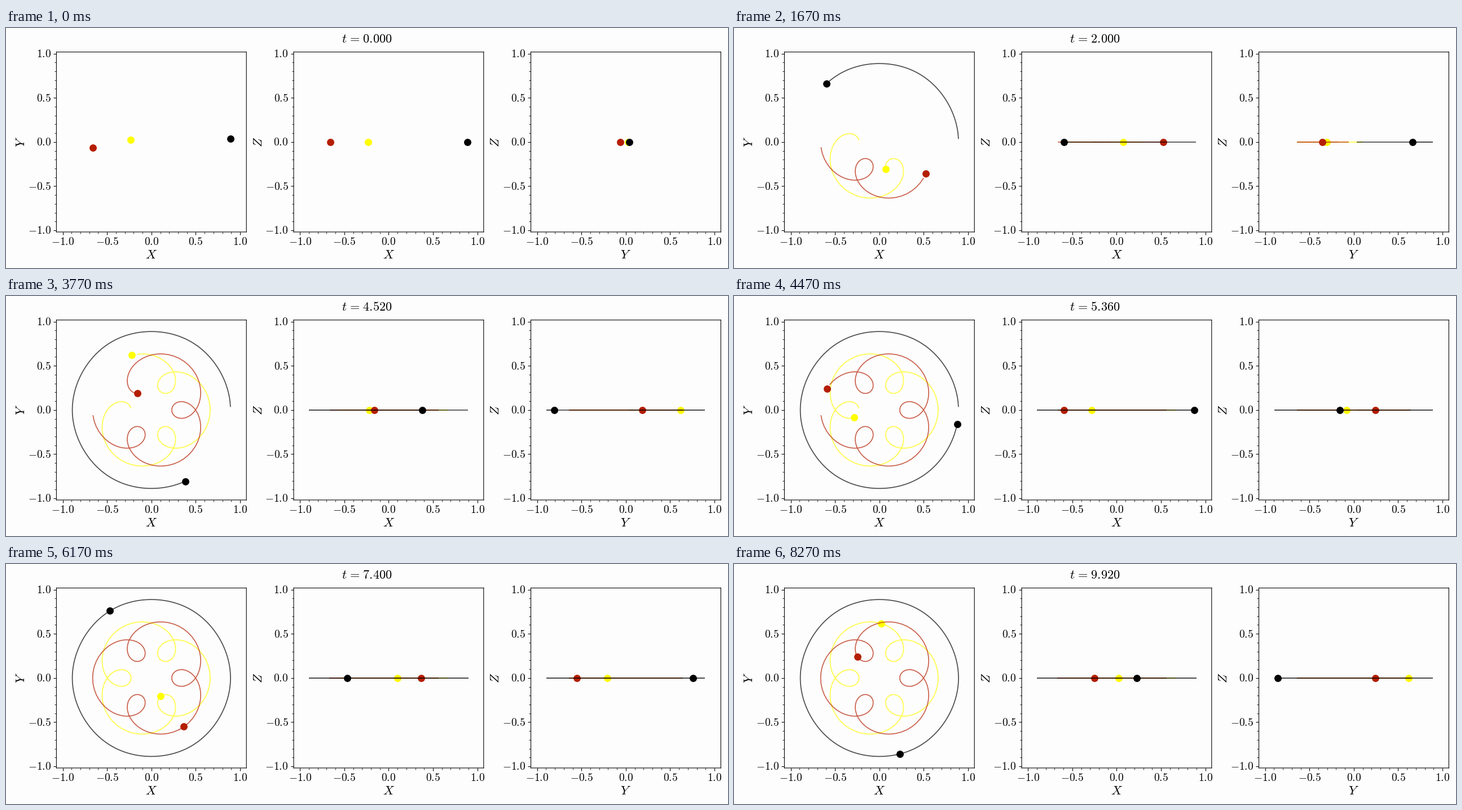
A matplotlib script for the animation above (8.3 s loop, 1280 by 427 pixels).

```python
import numpy as np
import matplotlib.pyplot as plt
from matplotlib.animation import FuncAnimation
from matplotlib.markers import TICKDOWN, TICKLEFT

WIDTH, HEIGHT, DPI = 1280, 427, 128
LOOP_MS, TICK_MS = 8300, 20
STEPS = 249                        # orbit positions shown per loop
DT, SUBSTEPS = 0.04, 20
REVOLUTION = 140                   # trail points that close the orbit
SCALE = 157.2                      # pixels per length unit
BOX_W, BOX_H, BOX_TOP = 336.8, 320.2, 42.7
BACKGROUND = "#fdfdfd"


def px(pixels):
    """Convert a length in pixels to points."""
    return pixels * 72 / DPI


def acceleration(z):
    gap = z[None, :] - z[:, None]
    return (gap / (np.abs(gap) ** 3 + np.eye(3))).sum(axis=1)


def rk4_step(z, v, h):
    k1z, k1v = v, acceleration(z)
    k2z, k2v = v + h / 2 * k1v, acceleration(z + h / 2 * k1z)
    k3z, k3v = v + h / 2 * k2v, acceleration(z + h / 2 * k2z)
    k4z, k4v = v + h * k3v, acceleration(z + h * k3z)
    return (z + h / 6 * (k1z + 2 * k2z + 2 * k3z + k4z),
            v + h / 6 * (k1v + 2 * k2v + 2 * k3v + k4v))


def integrate():
    """Periodic orbit of three unit masses (G = 1) in the complex plane."""
    z = np.array([-0.2291782474, -0.6628498947, 0.8920281421], dtype=complex)
    v = 1j * np.array([0.6233673964, -1.6191613336, 0.9957939373])
    path = []
    for _ in range(STEPS):
        for _ in range(SUBSTEPS):
            z, v = rk4_step(z, v, DT / SUBSTEPS)
        path.append(z)
    return np.array(path)


path = integrate()
coords = {"X": path.real, "Y": path.imag, "Z": np.zeros(path.shape)}
colors = ["#ffff00", "#b41e00", "#000000"]

plt.rcParams["mathtext.fontset"] = "cm"
fig = plt.figure(figsize=(WIDTH / DPI, HEIGHT / DPI), dpi=DPI,
                 facecolor=BACKGROUND)


def put_text(x, y, text, size=22.3, ha="center", va="baseline", **kwargs):
    return fig.text(x / WIDTH, 1 - y / HEIGHT, text, fontsize=px(size),
                    ha=ha, va=va, **kwargs)


def draw_ticks(ax, values, length, width):
    x_min, y_min = ax.get_xlim()[0], ax.get_ylim()[0]
    style = dict(linestyle="none", color="black", markersize=px(length),
                 markeredgewidth=px(width), clip_on=False)
    ax.plot(values, np.full(values.shape, y_min), marker=TICKDOWN, **style)
    ax.plot(np.full(values.shape, x_min), values, marker=TICKLEFT, **style)


def make_panel(left, h_name, v_name):
    ax = fig.add_axes([left / WIDTH, 1 - (BOX_TOP + BOX_H) / HEIGHT,
                       BOX_W / WIDTH, BOX_H / HEIGHT], facecolor=BACKGROUND)
    x_max, y_max = BOX_W / 2 / SCALE, BOX_H / 2 / SCALE
    ax.set(xlim=(-x_max, x_max), ylim=(-y_max, y_max), xticks=[], yticks=[])
    for spine in ax.spines.values():
        spine.set(linewidth=px(1.1), snap=False)

    major = np.arange(-2, 3) / 2
    minor = np.array([k / 10 for k in range(-10, 11) if k % 5])
    draw_ticks(ax, major, 4.9, 1.1)
    draw_ticks(ax, minor, 2.8, 0.85)

    mid_x, mid_y = left + BOX_W / 2, BOX_TOP + BOX_H / 2
    for value in major:
        label = f"${value:.1f}$"
        put_text(mid_x + value * SCALE, BOX_TOP + BOX_H + 22.8, label, 19.4)
        put_text(left - 9.6, mid_y - value * SCALE + 6.5, label, 19.4,
                 ha="right")
    put_text(mid_x, 404, f"${h_name}$", va="center")
    put_text(left - 62.2, mid_y, f"${v_name}$", va="center", rotation=90)

    artists = []
    for body, color in enumerate(colors):
        trail, = ax.plot([], [], color=color, alpha=0.7, lw=px(1.7),
                         zorder=3 + body)
        ball, = ax.plot([], [], "o", color=color, markersize=px(12.9),
                        markeredgewidth=0, zorder=3.5 + body)
        artists.append((trail, ball, coords[h_name][:, body],
                        coords[v_name][:, body]))
    return artists


movers = (make_panel(89.4, "X", "Y") + make_panel(510.0, "X", "Z")
          + make_panel(930.5, "Y", "Z"))
title = put_text(640, 26, "")


def update(tick):
    # Steps last a third of 100 ms, rounded to the nearest 10 ms.
    i = (6 * tick + 4) // 10
    title.set_text(rf"$t\hspace{{0.116}}=\hspace{{0.116}}{i * DT:.3f}$")
    recent = slice(max(0, i - REVOLUTION), i)
    for trail, ball, h, v in movers:
        trail.set_data(h[recent], v[recent])
        ball.set_data(h[i:i + 1], v[i:i + 1])
    return [title]


anim = FuncAnimation(fig, update, frames=LOOP_MS // TICK_MS, interval=TICK_MS,
                     repeat=True, repeat_delay=0)
plt.show()
```
